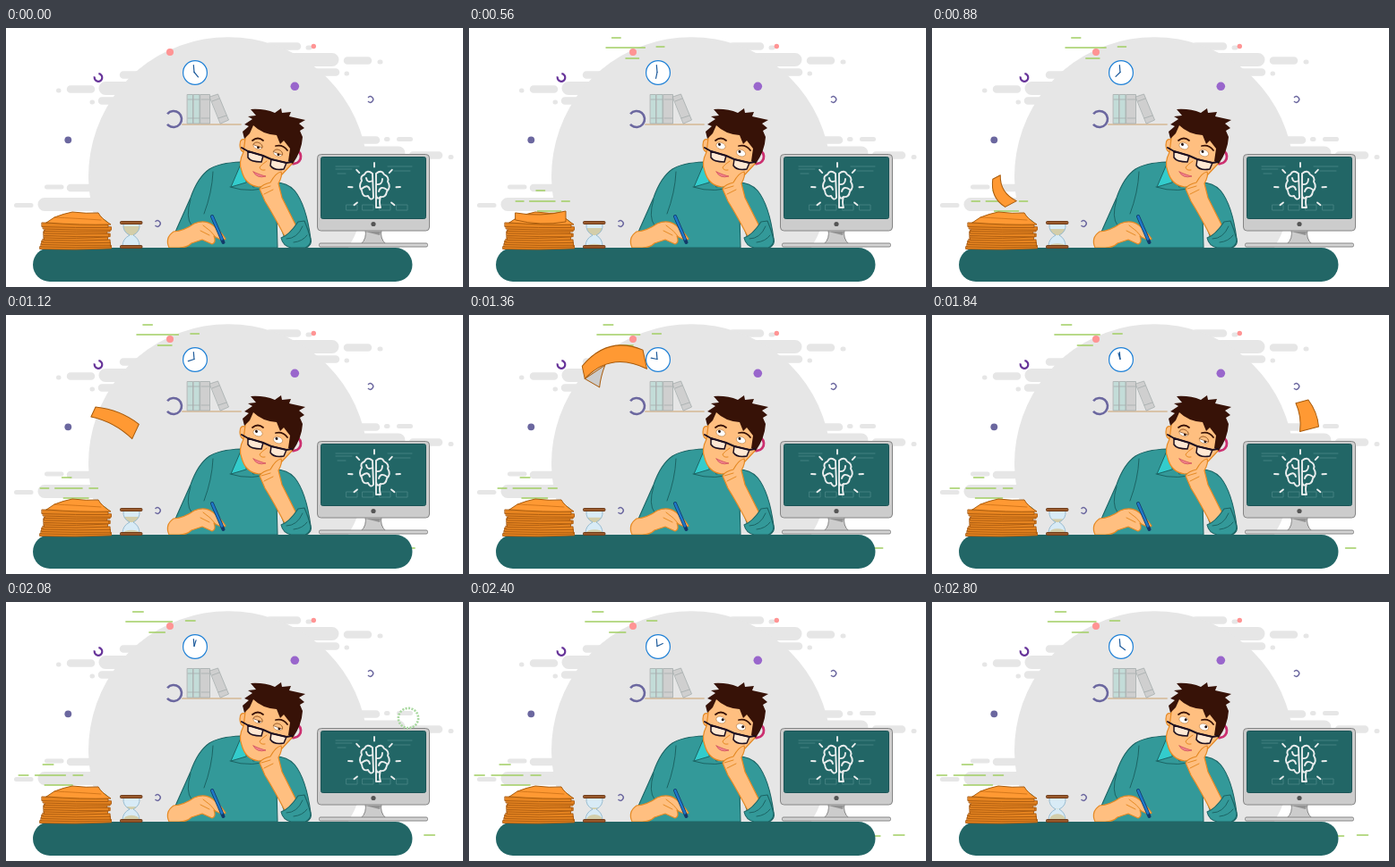
An HTML page for the animation above (2.88 s loop, 510 by 290 pixels).

```html
<!DOCTYPE html>
<html lang="en">
<head>
<meta charset="utf-8">
<title>Daydreaming at the desk</title>
<style>
  html, body { margin: 0; width: 100%; height: 100%; overflow: hidden; background: #fff; }
  svg { display: block; width: 100vw; height: 100vh; }
  path, line { stroke-linecap: round; stroke-linejoin: round; }
  .skin { fill: #ffbf80; stroke: #e58a25; stroke-width: 1.2; }
  .crease { fill: none; stroke: #e58a25; }
  .cloth { fill: #339999; stroke: #1c6464; stroke-width: 1.1; }
  .fold { fill: none; stroke: #1c6464; }
  .sheet { fill: #ff9933; stroke: #a85b0c; }
  .frame { fill: none; stroke: #1d1020; stroke-width: 1.5; }
  .chalk { fill: none; stroke: #e9eded; stroke-width: 1.9; }
</style>
</head>
<body>
<svg viewBox="0 0 510 290">
  <g stroke="#e6e6e6">
    <path stroke-width="5" d="M58.500 70H59M96 83H96.500M337 22H339M417 38H418M380 51H380.500M424.500 124.500H426M438.500 124.500H451.500M496 144.500H497M45.500 178H62M11.500 198.500H28"/>
    <path stroke-width="8.500" d="M131 52.500H165M72 68.500H95M107 81.500H126M294 20.500H325M381 36.500H404M343 49.500H368M388 125.500H413M454 142.500H483M72 179H105"/>
    <path stroke-width="15" d="M111 67.500H143M295 35.500H364M386 140H438M43 197.500H120"/>
  </g>
  <path d="M114 246A156 156 0 1 1 382 246Z" fill="#e6e6e6"/>

  <g id="dots">
    <circle cx="183" cy="27" r="4" fill="#ff9494"/>
    <circle cx="343.300" cy="20.500" r="2.700" fill="#ff9494"/>
    <circle cx="322.300" cy="65.300" r="4.800" fill="#9966cc"/>
    <circle cx="69.300" cy="125.300" r="3.900" fill="#6b679f"/>
    <circle cx="108.500" cy="219.500" r="5" fill="#12999b"/>
  </g>

  <circle cx="211" cy="50" r="13.400" fill="#fff" stroke="#1f80d6" stroke-width="1.200"/>
  <path d="M209.300 41.500L210 49.500" stroke="#1f5c9c" stroke-width="1.200"/>
  <line id="hand" x1="210" y1="49.500" x2="210" y2="42.500" stroke="#1f5c9c" stroke-width="1.200"/>

  <g stroke="#a5adad" stroke-width=".8">
    <path d="M197 108H262" stroke="#d9c3a8" stroke-width="2"/>
    <path d="M202.500 74.500H208.500V107H202.500ZM209.500 74.500H216V107H209.500Z" fill="#c3dcd8"/>
    <path d="M217 74.500H227.500V107H217ZM227.500 77L236.500 74L248.500 103L239.500 107Z" fill="#cfcfcf"/>
    <path d="M203 80H216M203 101H216M218 80H227M218 101H227M230 82L238 79M237 101L246 98"/>
  </g>

  <path id="streaks" fill="none" stroke="#a1ce63" stroke-width="1.600"
    d="M137.500 11H149.500M129.500 22H183M198.500 21H209.500M156.500 34H174.500M33.500 182H45.500M5.500 194H16.500M24.500 194H59.500M68.500 194H79.500M35.500 205H67.500M448 262H459.500M474.500 261H486.500"/>

  <!-- man -->
  <path class="cloth" d="M262 150Q238 151 227 158Q214 167 206 190L190 226Q184 236 190 246H303L302 210L312 238L318 246H335Q342 243 340 236Q335 198 322 182Q314 173 300 173L276 178Z"/>
  <path class="fold" d="M231 161Q230 184 221 208M299 178L302 212M250 178Q274 186 301 176M206 192Q200 212 207 221"/>
  <path d="M263 150L251 178L268 173Z" fill="#33cccc" stroke="#1c6464"/>
  <path class="skin" d="M182 246Q177 235 187 228Q199 227 210 219Q222 214 231 221Q239 227 245 236Q242 239 232 233Q235 240 230 242L219 237L207 241Q202 246 193 246Z"/>
  <path class="crease" d="M217 227L227 232M220 221Q229 227 234 234"/>
  <path d="M230 211L242.500 240" stroke="#123a6a" stroke-width="4"/>
  <path d="M230 211L241 236.500" stroke="#1f78c8" stroke-width="2.400"/>

  <path class="skin" d="M267 125Q261 123 261 131Q261 138 266 139Z"/>
  <path class="skin" d="M268 116L265 139Q259 151 263 160Q267 176 282 178Q296 177 308 164L320 151Q326 139 324 124L306 108L276 103Z"/>
  <path d="M266 124L264 116L271 110L266 108L275 102L270 99L279 98L273 91Q288 90 300 95L307 90L308 95L318 94L316 99L334 103L327 107L333 112L328 115L331 122Q330 138 320 152L315 149L317 135L310 126L306 130L302 120Q286 119 276 109L272 118Z" fill="#371207"/>
  <g id="eyes"></g>
  <path d="M275 126Q281 121 287 126M301 132Q309 130 314 137" fill="none" stroke="#371207" stroke-width="1.800"/>
  <path class="crease" d="M291 149Q285 153 283 156Q284 160 289 159"/>
  <path d="M276 161Q280 169 290 166Q285 165 276 161Z" fill="#f2848c" stroke="#d0505c" stroke-width=".8"/>
  <g class="frame">
    <path d="M270 138L287 143L285 150Q273 150 270 145ZM296 147L313 151L310 158Q299 160 295 154Z" fill="#fff" fill-opacity=".65"/>
    <path d="M263 134L270 138L287 143L296 147L313 151L319 150" stroke-width="2"/>
  </g>
  <path class="skin" d="M283 180Q286 175 295 173Q301 162 307 161Q309 165 304 174Q306 182 308 190L326 226L313 237Q299 210 289 194Z"/>
  <path class="crease" d="M285 180L295 177M288 186L298 181"/>
  <path class="cloth" d="M307 235Q316 232 326 217L333 216Q338 228 340 237Q340 243 334 246H318Q309 244 307 235Z"/>
  <path class="fold" d="M313 236Q325 236 331 222M321 240Q331 239 336 232"/>

  <!-- desk and monitor -->
  <path d="M401 226H419Q417 236 424 242H396Q403 236 401 226Z" fill="#ccc" stroke="#858585"/>
  <path d="M401 228H418L417 232Z" fill="#929292"/>
  <rect x="349.500" y="241" width="121" height="4" rx="1.500" fill="#d4d4d4" stroke="#858585"/>
  <rect x="30" y="246" width="423.500" height="38" rx="19" fill="#226666"/>
  <rect x="347.500" y="141.500" width="125" height="85.500" rx="4" fill="#ccc" stroke="#858585"/>
  <rect x="351.500" y="144.500" width="117" height="69" rx="2" fill="#226666" stroke="#1b5456"/>
  <circle cx="410" cy="219.500" r="2.600" fill="#555"/>
  <path d="M368 155H394M368 158H386M426 155H453M433 160H451M370 163H379M380 198h12v6h-12zM398 198h12v6h-12zM417 198h12v6h-12zM436 198h12v6h-12z" fill="none" stroke="#438080"/>
  <g id="idea" class="chalk">
    <path d="M409 163Q403 158 400 164Q395 166 397 171Q393 177 397 182Q398 190 404 188Q407 194 410 190ZM413 163Q419 158 422 164Q428 167 426 172Q430 178 425 183Q424 190 418 189Q414 193 413 187ZM409 171Q403 174 402 168M397 180Q404 174 406 181M413 175Q420 176 420 169M425 181Q418 176 416 183M413 187V201H418Q416 195 418 189"/>
  </g>

  <!-- paper stack and hourglass -->
  <g id="pages" fill="#e68420" stroke="#aa5b10" stroke-width=".9"></g>
  <path class="sheet" d="M45 218L54 212Q64 208 74 206Q90 208 103 207Q106 213 117 220Q84 221 45 218Z"/>
  <path d="M54 212Q76 213 106 215" fill="none" stroke="#c96f16" stroke-width=".8"/>

  <clipPath id="glass"><path d="M131 220Q130 228 138 232Q130 236 130 244H149Q149 236 142 232Q150 228 149 220Z"/></clipPath>
  <g clip-path="url(#glass)">
    <rect x="128" y="219" width="24" height="27" fill="#d8ebf6"/>
    <rect id="upperSand" x="128" width="24" fill="#d3ceaa"/>
    <ellipse id="lowerSand" cx="140" cy="244" rx="9" fill="#d3ceaa"/>
  </g>
  <path d="M131 220Q130 228 138 232Q130 236 130 244M149 220Q150 228 142 232Q149 236 149 244" fill="none" stroke="#91b7cd" stroke-width=".9"/>
  <path d="M129 218H150.500M129 245H150.500" stroke="#633515" stroke-width="4"/>
  <path d="M129 218H150.500M129 245H150.500" stroke="#98592c" stroke-width="2.600"/>

  <g id="flyer">
    <path id="underside" fill="#ccc" stroke="#a85b0c"/>
    <path id="face" class="sheet"/>
  </g>
  <circle id="burst" cx="449" cy="130" fill="none" stroke="#a9d8a0" stroke-width="2.600" pathLength="20" stroke-dasharray=".6 .4"/>
</svg>
<script>
const LOOP = 2880, STEP = 80;
const $ = id => document.getElementById(id);
const clamp = v => Math.min(1, Math.max(0, v));
const mix = (a, b, k) => a + (b - a) * k;
const smooth = k => k * k * (3 - 2 * k);
const show = (id, on) => set($(id), { visibility: on ? "visible" : "hidden" });

function set(node, attrs) {
  for (const name in attrs) node.setAttribute(name, attrs[name]);
}
function add(parent, tag, attrs) {
  const node = document.createElementNS("http://www.w3.org/2000/svg", tag);
  set(node, attrs);
  parent.append(node);
  return node;
}

let seed = 7;
function random() {
  seed = seed * 16807 % 2147483647;
  return seed / 2147483647;
}

// Open rings: the gap is centred on the given angle
function ring(x, y, r, width, stroke, gap = 180) {
  add($("dots"), "circle", {
    r, fill: "none", stroke, "stroke-width": width, pathLength: 100,
    "stroke-dasharray": "78 22", transform: `translate(${x} ${y}) rotate(${gap + 40})`
  });
}
ring(103, 55.5, 4.3, 2.2, "#663399", 235);
ring(187, 102, 9, 2.6, "#6b679f");
ring(406.5, 80, 3.2, 1.4, "#6b679f");
ring(169, 219, 3.2, 1.4, "#6b679f");
ring(321, 144, 8, 2.8, "#cc3070");

// Rays around the brain, none straight below
for (let i = 0; i < 7; i++) {
  const turn = i * 43 - 219;
  add($("idea"), "line", { x1: 24.5, x2: 29, transform: `translate(411 180) rotate(${turn})` });
}

// Loose pages, bottom to top
for (let y = 244; y > 217; y -= 2.5) {
  const left = 38 + random() * 6, right = 112 + random() * 6;
  const tilt = (random() - .5) * 3;
  add($("pages"), "path", { d: `M${left} ${y - tilt}L${right} ${y + tilt}v3.500Q78 ${y + 5} ${left} ${y + 3.5}Z` });
}

const eyes = [[281, 132], [303.5, 140]].map(([x, y]) => {
  const eye = add($("eyes"), "g", { transform: `translate(${x} ${y}) rotate(20)` });
  add(eye, "ellipse", { rx: 5.3, ry: 3.7, fill: "#fff", stroke: "#b87a3c", "stroke-width": .6 });
  const pupil = add(eye, "circle", { r: 1.5, fill: "#25110c" });
  const lid = add(eye, "path", { d: "M-5.300 0A5.300 3.700 0 0 1 5.300 0Z", fill: "#ffbf80", stroke: "#8a4d1b", "stroke-width": .7 });
  return { pupil, lid };
});

// Key poses of the flying page: time, x, y, angle, half length, half width, bend
const poses = [
  [400, 79, 213, 2, 32, 5, 0],
  [560, 80, 211, 0, 28, 5, -6],
  [880, 80, 182, 62, 17, 6, -11],
  [1360, 162, 57, -12, 35, 9, 26],
  [1600, 353, 77, 46, 38, 17, 14],
  [1960, 449, 130, 90, 5, 5, 0]
];

function drawFlyer(t) {
  const next = poses.findIndex(pose => pose[0] > t);
  const curl = clamp(1 - Math.abs(t - 1360) / 240);
  show("flyer", next > 0);
  if (next < 1) return;

  const from = poses[next - 1], to = poses[next];
  const k = (t - from[0]) / (to[0] - from[0]);
  const [, x, y, angle, len, half, bend] = from.map((v, i) => mix(v, to[i], k));
  const tail = half * .8, head = half * 1.2;
  set($("flyer"), { transform: `translate(${x} ${y}) rotate(${angle})` });
  set($("face"), {
    d: `M${-len} ${-tail}Q0 ${-half - bend} ${len} ${-head}L${len} ${head}Q0 ${half - bend} ${-len} ${tail}Z`
  });
  set($("underside"), {
    opacity: clamp(curl * 3),
    d: `M${-len} ${tail}L${-len * .28} ${half - 12}Q${-len * .5} ${half} ${-len * .6} ${half + 11 * curl}Z`
  });
}

function draw(t) {
  const turn = t / LOOP;
  set($("hand"), { transform: `rotate(${140 + 360 * mix(turn, turn * turn, .32)} 210 49.5)` });

  // Streaks spread outwards from the middle of the scene
  const spread = Math.min(1, .757 + t * 1e-4);
  set($("streaks"), {
    opacity: clamp(t / 400),
    transform: `translate(255 0) scale(${spread} 1) translate(-255 0)`
  });

  const drowsy = t < 400 || (t >= 1520 && t < 2160);
  const gaze = t < 400 ? 1 : t < 1520 ? -2 : 2;
  for (const { pupil, lid } of eyes) {
    set(pupil, { cx: gaze, cy: drowsy ? 1.2 : -1 });
    set(lid, { visibility: drowsy ? "visible" : "hidden" });
  }

  set($("upperSand"), { y: 222 + 10 * turn, height: 10 * (1 - turn) });
  set($("lowerSand"), { ry: 1 + 6 * turn });

  drawFlyer(t);

  const grow = clamp((t - 2000) / 330);
  show("burst", grow > 0);
  set($("burst"), { r: 3 + 55 * smooth(grow), opacity: clamp((1 - grow) * 2) });
}

function tick() {
  const t = performance.now() % LOOP;
  draw(Math.floor(t / STEP) * STEP);
  requestAnimationFrame(tick);
}
tick();
</script>
</body>
</html>
```
